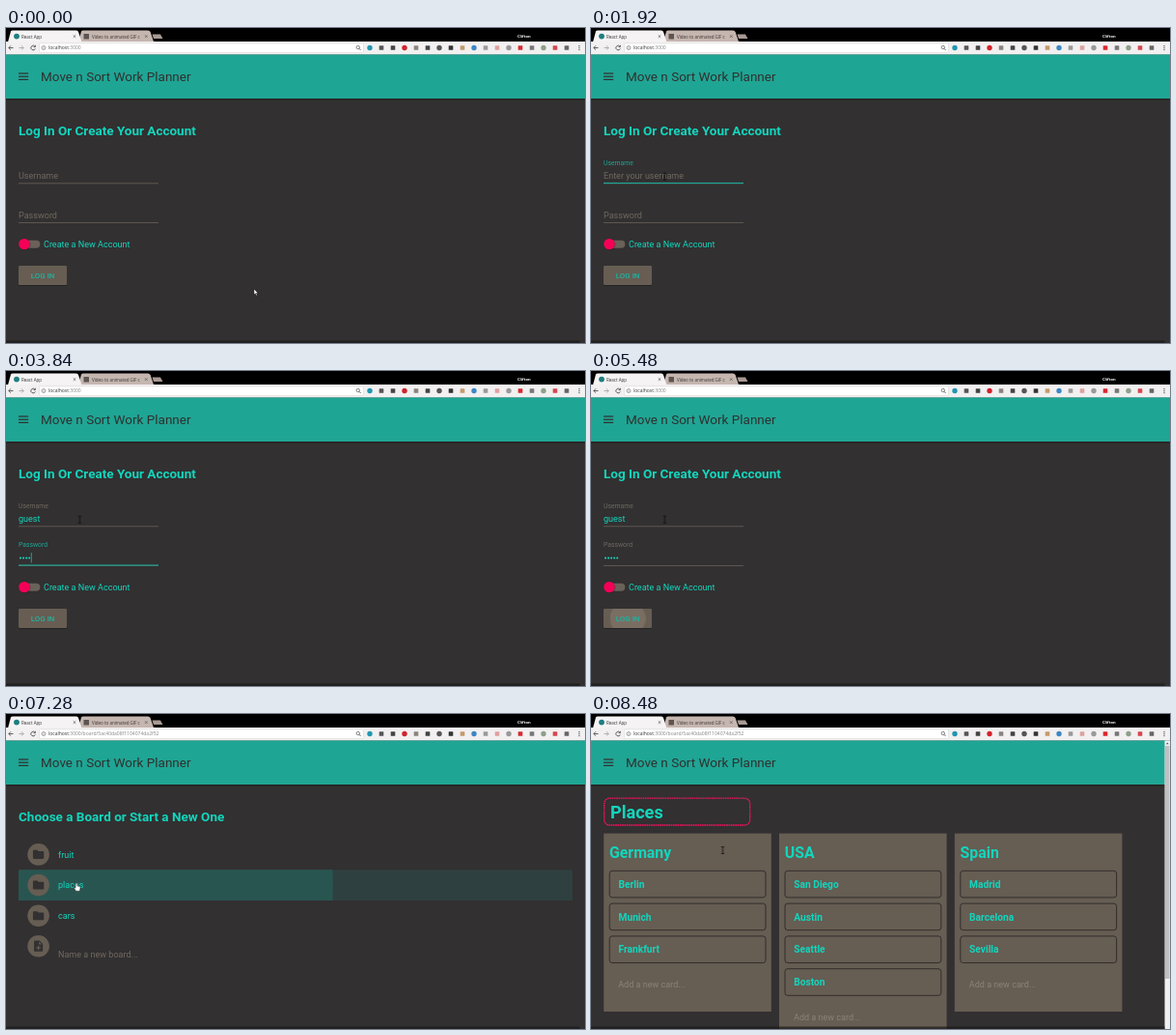
These frames come from a looping animation (600x326 px, 8.52 s). An HTML page:

```html
<!DOCTYPE html>
<html lang="en">
<head>
<meta charset="utf-8">
<title>Task board demo</title>
<style>
  html, body { margin: 0; width: 100%; height: 100%; overflow: hidden; background: #323031; }
  svg { display: block; width: 100vw; height: 100vh; }
  text { font-family: Roboto, sans-serif; white-space: pre; }
  .ui text { font-family: "Open Sans", sans-serif; }
  .centered { transform-box: fill-box; transform-origin: center; }
</style>
</head>
<body>
<svg id="stage" viewBox="0 0 600 326"></svg>
<script>
const LOOP = 8520;
const BG = '#323031', TEAL = '#12d6bd', BAR = '#1fa594', TAUPE = '#665d53', MUTED = '#70685f', PINK = '#f50057';
const EASE_OUT = 'cubic-bezier(.23,1,.32,1)';
const BODY = 9.06;

// Moments of the story, in ms
const FOCUS_USER = 1360, FOCUS_PASS = 2920, FOCUS_TOGGLE = 4240, FOCUS_BUTTON = 4880;
const BOARDS = 5720, HOVER = 6440, NEXT_ROW = 6600, CLICK = 7040, URL_CHANGE = 7280, BOARD = 7320;

const stage = document.getElementById('stage');

function add(parent, tag, attrs = {}, content) {
  const node = document.createElementNS('http://www.w3.org/2000/svg', tag);
  for (const key in attrs) node.setAttribute(key, attrs[key]);
  if (content !== undefined) node.textContent = content;
  parent.append(node);
  return node;
}
const group = (parent, attrs) => add(parent, 'g', attrs);
const rect = (parent, x, y, width, height, fill, more) =>
  add(parent, 'rect', { x, y, width, height, fill, ...more });
const circle = (parent, cx, cy, r, fill, more) => add(parent, 'circle', { cx, cy, r, fill, ...more });
const path = (parent, d, attrs) => add(parent, 'path', { d, ...attrs });
const label = (parent, x, y, size, fill, content, weight = 400) =>
  add(parent, 'text', { x, y, 'font-size': size, fill, 'font-weight': weight }, content);

// steps: [ms, properties, easing towards the next step]
function play(node, steps) {
  const all = [...steps];
  if (all[0][0] > 0) all.unshift([0, all[0][1]]);
  const last = all[all.length - 1];
  if (last[0] < LOOP) all.push([LOOP, last[1]]);
  node.animate(
    all.map(([ms, props, easing = 'linear']) => ({ offset: ms / LOOP, easing, ...props })),
    { duration: LOOP, iterations: Infinity });
}
function show(node, from, to = LOOP) {
  const steps = [[from, { opacity: 1 }, 'step-end']];
  if (from > 0) steps.unshift([0, { opacity: 0 }, 'step-end']);
  if (to < LOOP) steps.push([to, { opacity: 0 }, 'step-end']);
  play(node, steps);
  return node;
}

function drawBrowser() {
  const ui = group(stage, { class: 'ui' });
  rect(ui, 0, 0, 600, 15, '#000');
  path(ui, 'M75 14L78 3.5Q78.5 2.5 80 2.5H147Q149 2.5 149.6 4L153 14Z', { fill: '#c5b6b0' });
  path(ui, 'M153 11L151.5 6.5H160L162.500 11Z', { fill: '#a99a94' });
  path(ui, 'M2 14.500L5 3.500Q5.500 2.500 7 2.500H73Q74.500 2.500 75 4L78.500 14.500Z', { fill: '#f5f3f3' });
  rect(ui, 0, 14, 600, 13.6, '#f2f0f0');
  circle(ui, 11, 8.600, 2.900, '#1e7f80');
  label(ui, 16, 10.500, 4.500, '#333', 'React App');
  rect(ui, 80.5, 6, 5.500, 5.500, '#5c5553');
  label(ui, 89, 10.500, 4.500, '#3c3432', 'Video to animated GIF c');
  for (const x of [71, 145.300])
    path(ui, `M${x - 1.300} 7.300l2.600 2.600m0-2.600l-2.600 2.600`, { stroke: '#555', 'stroke-width': .7 });
  label(ui, 530, 10.300, 4.100, '#fff', 'Clifton', 700);

  const nav = { fill: 'none', stroke: '#555', 'stroke-width': .9 };
  path(ui, 'M7.500 20.500H2.800M5 18.300L2.800 20.500L5 22.700', nav);
  path(ui, 'M13.500 20.500H18.200M16 18.300L18.200 20.500L16 22.700', { ...nav, stroke: '#aaa' });
  path(ui, 'M30 19.200A2.300 2.300 0 1 0 30.300 21.300M30.400 17.800V19.600H28.600', nav);
  rect(ui, 34.500, 15.800, 336, 9.800, '#fff', { rx: 1.200, stroke: '#d5d1d1', 'stroke-width': .5 });
  circle(ui, 39, 20.500, 2, 'none', { stroke: '#666', 'stroke-width': .6 });
  path(ui, 'M39 20.200V21.700M39 19.200V19.700', { stroke: '#666', 'stroke-width': .6 });
  circle(ui, 364.800, 20, 1.700, 'none', { stroke: '#666', 'stroke-width': .8 });
  path(ui, 'M366 21.300L367.600 23', nav);

  const host = label(ui, 44, 22.400, 5, '#333', 'localhost');
  const tail = x => label(ui, x, 22.400, 5, '#858585', ':3000');
  const port = tail(44 + host.getComputedTextLength());
  const route = label(ui, 78, 22.400, 5, '#858585', '/board/5ac40da08f1104074da2f52');
  route.setAttribute('x', +port.getAttribute('x') + port.getComputedTextLength());
  show(route, URL_CHANGE);

  const icons = ['#2097b0', '#555', '#444', '#d3222a', '#8b837e', '#444', '#555', '#333', '#c49a6c', '#3d87c4',
    '#9a9a9a', '#e0a0a0', '#999', '#d8282f', '#777', '#8da08a', '#d64550', '#666'];
  icons.forEach((color, i) => {
    const x = 377 + i * 12;
    if (i % 3) rect(ui, x - 2.300, 18.200, 4.600, 4.600, color, { rx: .5 });
    else circle(ui, x, 20.500, 2.700, color);
  });
  for (const y of [18.500, 20.500, 22.500]) circle(ui, 594, y, .65, '#555');
}

function drawAppBar() {
  rect(stage, 0, 73, 600, 1, '#000', { opacity: .28 });
  rect(stage, 0, 74, 600, 1.200, '#000', { opacity: .12 });
  rect(stage, 0, 27.500, 600, 45.500, BAR);
  for (const y of [46.400, 49.600, 52.800]) rect(stage, 13, y, 10.200, 1.200, '#30302f');
  label(stage, 36, 54.800, 13.5, '#30302f', 'Move n Sort Work Planner');
}

function drawField(parent, name, hint, base, focus, blur, firstKey) {
  rect(parent, 13, base + 4.500, 145, .7, MUTED);
  const line = rect(parent, 13, base + 3.900, 145, 1.200, BAR, { class: 'centered' });
  play(line, [
    [focus, { transform: 'scaleX(0)' }, EASE_OUT],
    [focus + 450, { transform: 'scaleX(1)' }],
    [blur, { transform: 'scaleX(1)' }, EASE_OUT],
    [blur + 450, { transform: 'scaleX(0)' }],
  ]);

  const title = label(parent, 0, 0, BODY, MUTED, name);
  const rest = `translate(13px,${base}px) scale(1)`;
  const raised = `translate(13px,${base - 14.200}px) scale(.75)`;
  play(title, [
    [focus, { transform: rest, fill: MUTED }, EASE_OUT],
    [focus + 450, { transform: raised, fill: BAR }],
    [blur, { transform: raised, fill: BAR }, EASE_OUT],
    [blur + 450, { transform: raised, fill: MUTED }],
  ]);

  const placeholder = label(parent, 13, base - .5, BODY, MUTED, hint);
  play(placeholder, [
    [focus, { opacity: 0 }, EASE_OUT],
    [focus + 450, { opacity: 1 }],
    [firstKey, { opacity: 1 }, 'step-end'],
    [firstKey + 1, { opacity: 0 }],
  ]);
}

function drawCaret(parent, x, base, from, to) {
  show(rect(parent, x, base - 8.500, .7, 10.500, TEAL), from, to);
}

function drawLogin() {
  const page = show(group(stage), 0, BOARDS);
  label(page, 13, 110.600, 13.5, TEAL, 'Log In Or Create Your Account', 700);

  const userKeys = [2120, 2240, 2360, 2480, 2640];
  drawField(page, 'Username', 'Enter your username', 156, FOCUS_USER, FOCUS_PASS, userKeys[0]);
  drawCaret(page, 13.200, 156, FOCUS_USER, FOCUS_USER + 530);
  userKeys.forEach((key, i) => {
    const next = userKeys[i + 1];
    const typed = label(page, 13, 156.300, BODY, TEAL, 'guest'.slice(0, i + 1));
    drawCaret(page, 13.300 + typed.getComputedTextLength(), 156, key, next || FOCUS_PASS);
    show(typed, key, next);
  });

  const passKeys = [3440, 3560, 3680, 3800, 4000];
  drawField(page, 'Password', 'Enter your password', 196.500, FOCUS_PASS, FOCUS_TOGGLE, passKeys[0]);
  drawCaret(page, 13.200, 196.500, FOCUS_PASS, passKeys[0]);
  passKeys.forEach((key, i) => {
    show(circle(page, 15 + i * 3.050, 193.500, 1.050, TEAL), key);
    drawCaret(page, 16.700 + i * 3.050, 196.500, key, passKeys[i + 1] || FOCUS_TOGGLE);
  });

  drawToggle(page);
  drawButton(page);
}

function pulse(node, from, to) {
  show(node, from, to);
  play(node, [
    [from, { transform: 'scale(0)' }, EASE_OUT],
    [from + 300, { transform: 'scale(1)' }, 'ease-in-out'],
    [Math.min(from + 620, to), { transform: 'scale(.88)' }, 'ease-in-out'],
    [to, { transform: 'scale(1)' }],
  ]);
}

function drawToggle(page) {
  rect(page, 15, 219.700, 20.300, 8, '#6a6159', { rx: 4 });
  pulse(circle(page, 19, 223.600, 10.500, '#fff', { class: 'centered', 'fill-opacity': .16 }),
    FOCUS_TOGGLE, FOCUS_BUTTON);
  circle(page, 19.500, 224.100, 6, '#000', { opacity: .25 });
  circle(page, 19, 223.600, 5.700, PINK);
  label(page, 39, 227.200, BODY, TEAL, 'Create a New Account');
}

function drawButton(page) {
  rect(page, 13, 246.700, 50, 20.300, '#000', { rx: 1.200, opacity: .25 });
  rect(page, 13, 246, 50, 20, '#675d53', { rx: 1.200 });
  const clip = add(page, 'clipPath', { id: 'button' });
  rect(clip, 13, 246, 50, 20, '#fff');
  const inner = group(page, { 'clip-path': 'url(#button)' });
  pulse(circle(inner, 38, 256, 21, '#85796c', { class: 'centered', 'fill-opacity': .65 }), FOCUS_BUTTON, BOARDS);
  label(page, 25.800, 259, 7.920, '#1bb5a1', 'LOG IN', 500);
}

function drawBoardList() {
  const page = show(group(stage), BOARDS, BOARD);
  label(page, 13, 110.600, 13.5, TEAL, 'Choose a Board or Start a New One', 700);
  const rowTop = i => 129.600 + i * 31.700;
  const highlight = (i, from, to) => show(rect(page, 13, rowTop(i), 574, 31.700, '#2e403f'), from, to);
  highlight(0, HOVER, NEXT_ROW);
  highlight(1, NEXT_ROW, BOARD);

  const clip = add(page, 'clipPath', { id: 'row' });
  rect(clip, 13, rowTop(1), 574, 31.700, '#fff');
  const inner = group(page, { 'clip-path': 'url(#row)' });
  const ripple = circle(inner, 73, 177, 300, TEAL, { class: 'centered', 'fill-opacity': .14 });
  show(ripple, CLICK, BOARD);
  play(ripple, [[CLICK, { transform: 'scale(0)' }, EASE_OUT], [CLICK + 700, { transform: 'scale(1)' }]]);

  const folder = 'M10 4H4c-1.100 0-2 .9-2 2v12c0 1.100.9 2 2 2h16c1.100 0 2-.9 2-2V8c0-1.100-.9-2-2-2h-8z';
  const newFile = 'M14 2H6c-1.100 0-2 .9-2 2v16c0 1.100.9 2 2 2h12c1.100 0 2-.9 2-2V8zm2 14h-3v3h-2v-3H8v-2h3v-3h2v3h3zM13 9V3.500L18.500 9z';
  const avatar = (y, icon) => {
    circle(page, 33.600, y, 11.300, TAUPE);
    path(page, icon, { fill: BG, transform: `translate(26.800 ${y - 6.800}) scale(.566)` });
  };
  ['fruit', 'places', 'cars'].forEach((name, i) => {
    avatar(rowTop(i) + 15.800, folder);
    label(page, 54, rowTop(i) + 19, BODY, TEAL, name);
  });
  avatar(240.200, newFile);
  label(page, 54, 252, BODY, MUTED, 'Name a new board...');
}

function drawBoard() {
  const page = show(group(stage), BOARD);
  rect(page, 13.700, 87.200, 151, 27.800, 'none',
    { rx: 5.500, stroke: '#f5125f', 'stroke-width': 1.300, 'stroke-dasharray': '1.700 .6' });
  label(page, 20, 107.800, 18.1, TEAL, 'Places', 700);

  const lists = {
    Germany: ['Berlin', 'Munich', 'Frankfurt'],
    USA: ['San Diego', 'Austin', 'Seattle', 'Boston'],
    Spain: ['Madrid', 'Barcelona', 'Sevilla'],
  };
  Object.entries(lists).forEach(([name, cards], column) => {
    const x = 13.200 + column * 181.800;
    const cardTop = i => 162.300 + i * 33.800;
    rect(page, x, 123.600, 173.600, 83 + cards.length * 33.800, TAUPE);
    label(page, x + 5.800, 149, 15.85, TEAL, name, 700);
    cards.forEach((card, i) => {
      rect(page, x + 6, cardTop(i), 161.800, 27.600, 'none', { rx: 2.800, stroke: '#2d2a28', 'stroke-width': .9 });
      label(page, x + 15.300, cardTop(i) + 17.500, 10.2, TEAL, card, 700);
    });
    label(page, x + 15, cardTop(cards.length) + 19.300, BODY, '#8b8278', 'Add a new card...');
  });

  rect(page, 594.500, 27.500, 5.500, 299, '#f1f0f0');
  rect(page, 595, 33, 4.500, 241, '#c1bfbf');
  path(page, 'M595.800 31.300L597.250 29.500L598.700 31.300Z', { fill: '#555' });
}

function drawPointer() {
  const pointer = group(stage);
  const at = (x, y) => ({ transform: `translate(${x}px,${y}px)` });
  play(pointer, [
    [0, at(257, 270)],
    [40, at(257, 270), 'ease-in-out'],
    [600, at(76.400, 153.700)],
    [HOVER, at(76.400, 153.700), 'ease-out'],
    [6760, at(73, 174)],
    [7200, at(73, 174)],
    [7400, at(73, 176)],
    [7800, at(73, 176), 'ease-in-out'],
    [8440, at(136.500, 141)],
  ]);
  const outline = { fill: '#fff', stroke: '#111', 'stroke-width': .5 };
  const arrow = path(pointer, 'M0 0V6L1.400 4.800L2.400 7L3.400 6.500L2.400 4.400H4.200Z', outline);
  const hand = path(pointer,
    'M0 0c.6 0 .9.4.9 1v2l2.400.6c.6.1.9.6.8 1.100L3.500 8.500H-.3L-2.700 5.200c.4-.7 1.100-.7 1.800 0V1c0-.6.3-1 .9-1z', outline);
  const beam = () => path(pointer, 'M-1.400-3.500H1.400M0-3.500V3.500M-1.400 3.500H1.400',
    { fill: 'none', stroke: '#0c0c0c', 'stroke-width': .8 });
  show(arrow, 0, 520);
  show(beam(), 520, HOVER);
  show(hand, HOVER, 8280);
  show(beam(), 8280);
}

rect(stage, 0, 0, 600, 326, BG);
drawBrowser();
drawAppBar();
drawLogin();
drawBoardList();
drawBoard();
rect(stage, 0, 323.500, 594.500, 2.500, '#1c1a1b', { opacity: .7 });
drawPointer();
</script>
</body>
</html>
```
